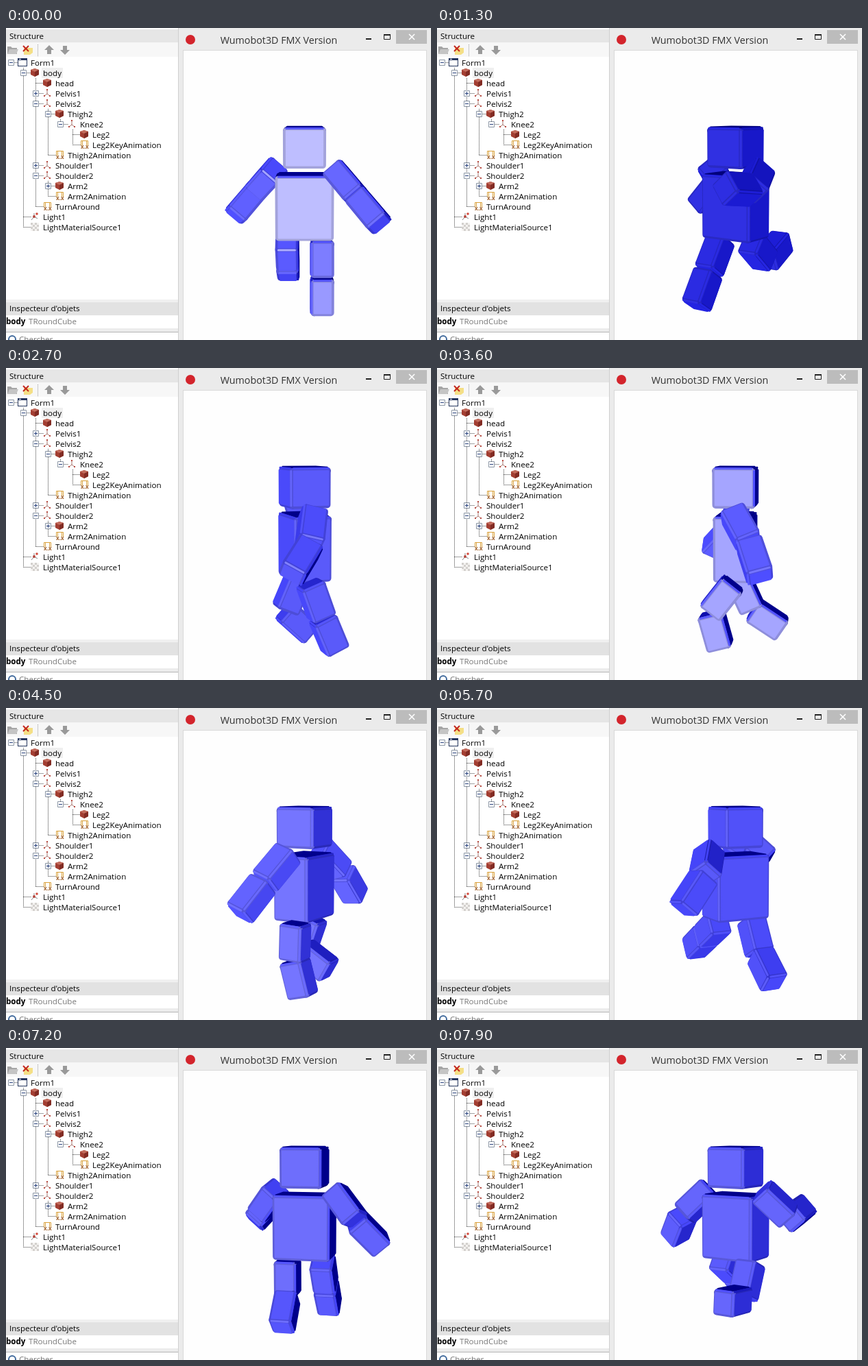
Recreate the animation shown at these times as an HTML page with a canvas. Size 620 px wide and 455 px high, loop 8 s.

```html
<!DOCTYPE html>
<html lang="fr">
<head>
<meta charset="utf-8">
<title>Wumobot3D</title>
<style>
html, body { margin: 0; width: 620px; height: 455px; overflow: hidden; background: #fff; }
canvas { display: block; }
</style>
</head>
<body>
<canvas id="stage" width="620" height="455"></canvas>
<script>
const g = document.getElementById('stage').getContext('2d');
const LOOP = 8000, STEP = 100, RAD = Math.PI / 180;
const UI = '"Open Sans", "Noto Sans", sans-serif';

// ---------- drawing helpers ----------
function box(x, y, w, h, color) {
  g.fillStyle = color;
  g.fillRect(x, y, w, h);
}
function frame(x, y, w, h, color) {
  g.strokeStyle = color;
  g.lineWidth = 1;
  g.strokeRect(x + .5, y + .5, w - 1, h - 1);
}
function path(points, closed) {
  g.beginPath();
  points.forEach(([x, y]) => g.lineTo(x, y));
  if (closed) g.closePath();
}
function poly(points, color, edge = 0) {
  path(points, true);
  g.fillStyle = g.strokeStyle = color;
  g.fill();
  if (!edge) return;
  g.lineWidth = edge;
  g.stroke();
}
function line(points, color, width = 1) {
  path(points);
  g.strokeStyle = color;
  g.lineWidth = width;
  g.stroke();
}
function disc(x, y, r, color) {
  g.beginPath();
  g.arc(x, y, r, 0, 7);
  g.fillStyle = color;
  g.fill();
}
function label(text, x, y, size = 11.6, color = '#000', weight = '') {
  g.font = `${weight} ${size}px ${UI}`;
  g.fillStyle = color;
  g.fillText(text, x, y);
}

// ---------- component tree ----------
const icons = {
  form(x, y) {
    box(x - 7, y - 6, 14, 12, '#23345c');
    box(x - 6, y - 3, 12, 8, '#fff');
    box(x - 5, y - 5, 3, 1, '#fff');
  },
  cube(x, y) {
    poly([[x, y - 6], [x + 6, y - 4], [x + 6, y + 3], [x, y + 6], [x - 6, y + 3], [x - 6, y - 4]], '#a33e32');
    poly([[x, y - 6], [x + 6, y - 4], [x, y - 1], [x - 6, y - 4]], '#c26c5d');
    poly([[x, y - 1], [x + 6, y - 4], [x + 6, y + 3], [x, y + 6]], '#812b23');
  },
  axes(x, y) {
    line([[x, y - 5], [x, y + 1], [x - 4, y + 4]], '#a9756d');
    line([[x, y + 1], [x + 4, y + 4]], '#a9756d');
    [[0, -5], [-4, 4], [4, 4]].forEach(([a, b]) => box(x + a - 1, y + b - 1, 2, 2, '#b7493f'));
  },
  film(x, y) {
    frame(x - 5, y - 6, 11, 12, '#d9a13c');
    box(x - 3, y - 6, 1, 9, '#d9a13c');
    box(x + 3, y - 6, 1, 9, '#d9a13c');
    box(x - 5, y + 1, 11, 6, '#fff');
    label('x.x', x - 5, y + 6, 8, '#a0612c', 'bold');
  },
  light(x, y) {
    line([[x - 5, y + 5], [x - 1, y], [x - 1, y - 5]], '#888');
    line([[x - 1, y], [x + 4, y + 3]], '#888');
    disc(x + 3, y - 4, 1.8, '#d34b3e');
    disc(x - 1, y, 2, '#b7493f');
  },
  checks(x, y) {
    for (let i = 0; i < 16; i++)
      box(x - 6 + i % 4 * 3, y - 6 + (i >> 2) * 3, 3, 3, (i + (i >> 2)) % 2 ? '#f4f2f0' : '#d3d0cd');
  }
};
// depth, icon, expander, caption
const tree = [
  [0, 'form', '-', 'Form1'], [1, 'cube', '-', 'body'], [2, 'cube', '', 'head'],
  [2, 'axes', '+', 'Pelvis1'], [2, 'axes', '-', 'Pelvis2'], [3, 'cube', '-', 'Thigh2'],
  [4, 'axes', '-', 'Knee2'], [5, 'cube', '', 'Leg2'], [5, 'film', '', 'Leg2KeyAnimation'],
  [3, 'film', '', 'Thigh2Animation'], [2, 'axes', '+', 'Shoulder1'], [2, 'axes', '-', 'Shoulder2'],
  [3, 'cube', '+', 'Arm2'], [3, 'film', '', 'Arm2Animation'], [2, 'film', '', 'TurnAround'],
  [1, 'light', '', 'Light1'], [1, 'checks', '', 'LightMaterialSource1']
];
const rowY = i => 50 + 15 * i;

function drawTree() {
  g.setLineDash([1, 1]);
  tree.forEach(([depth], i) => {
    const x = 7.5 + 18 * depth, y = rowY(i) + .5;
    line([[x, y], [x + 11, y]], '#444');
    if (!depth) return;
    let parent = i;
    while (tree[parent][0] >= depth) parent--;
    line([[x, rowY(parent) + 8], [x, y]], '#444');
  });
  g.setLineDash([]);
  box(52, 58, 31, 15, '#efefef');
  tree.forEach(([depth, icon, expander, caption], i) => {
    const x = 7 + 18 * depth, y = rowY(i);
    if (expander) {
      box(x - 4, y - 4, 9, 9, '#fff');
      frame(x - 4, y - 4, 9, 9, '#8c97a5');
      box(x - 2, y, 5, 1, '#27407c');
      if (expander === '+') box(x, y - 2, 1, 5, '#27407c');
    }
    icons[icon](x + 17, y);
    label(caption, x + 29, y + 5);
  });
}

function drawPanel() {
  box(0, 0, 251, 455, '#fff');
  box(0, 2, 251, 19, '#e6e6e6');
  label('Structure', 5, 16);
  box(0, 21, 251, 21, '#f7f7f7');
  poly([[2, 27], [7, 27], [9, 29], [16, 29], [16, 38], [2, 38]], '#a5a5a5');
  poly([[5, 31], [18, 31], [15, 38], [2, 38]], '#c4c4c4');
  poly([[26, 29], [39, 29], [39, 36], [35, 39], [26, 39]], '#f4df86');
  line([[25, 26], [33, 34]], '#c3261d', 2);
  line([[33, 26], [25, 34]], '#c3261d', 2);
  g.setLineDash([1, 1]);
  line([[46.5, 24], [46.5, 41]], '#999');
  g.setLineDash([]);
  const arrow = [[0, -7], [7, 0], [3, 0], [3, 6], [-3, 6], [-3, 0], [-7, 0]];
  poly(arrow.map(([x, y]) => [63 + x, 32 + y]), '#999');
  poly(arrow.map(([x, y]) => [86 + x, 32 - y]), '#999');
  drawTree();
  box(0, 396, 251, 4, '#f0f0f0');
  box(0, 400, 251, 19, '#e2e2e2');
  label("Inspecteur d'objets", 5, 413);
  label('body', 0, 432, 11.6, '#000', 'bold');
  label('TRoundCube', 33, 432, 11.6, '#777');
  box(0, 438, 251, 5, '#ececec');
  box(0, 443, 251, 1, '#b5b5b5');
  g.beginPath();
  g.arc(9, 454, 5, 0, 7);
  g.strokeStyle = '#426b9d';
  g.lineWidth = 2;
  g.stroke();
  label('Chercher', 19, 458, 11.6, '#777');
}

function drawWindow() {
  box(251, 0, 369, 455, '#ebebeb');
  box(251, 0, 1, 455, '#cfcfcf');
  box(258, 32, 356, 423, '#d9d9d9');
  box(259, 33, 354, 422, '#fefefe');
  disc(269, 17, 7, '#d3242c');
  g.textAlign = 'center';
  label('Wumobot3D FMX Version', 398, 23, 14.3, '#333');
  g.textAlign = 'left';
  box(525, 15, 8, 2, '#222');
  frame(551, 9, 10, 8, '#222');
  box(551, 9, 10, 2, '#222');
  box(569, 3, 45, 20, '#bcbcbc');
  line([[588, 9], [596, 17]], '#fff', 1.6);
  line([[596, 9], [588, 17]], '#fff', 1.6);
}

// ---------- walking figure ----------
// time, left arm, left elbow, right arm, right elbow,
// left thigh, left knee, right thigh, right knee, highlight
const poses = [
  [0, 34, 2, -42, 66, 8, 3, -42, 22, 1],
  [1.3, 60, 40, -55, 60, -50, 65, 35, 1, .45],
  [2.7, 18, 20, -35, 20, -20, 3, 24, 70, .92],
  [4.5, 20, -2, -22, 15, 2, 18, 20, 80, 1.08],
  [5.7, -45, 36, 60, 60, 58, 0, -29, 22, .9],
  [6.5, 30, 35, -10, 10, 0, 2, 42, 3, .95],
  [7.9, -25, 50, 25, 75, 55, 5, -25, 70, .95]
];

// plain two-second stride
function stride(t) {
  const w = 2 * Math.PI * (.07 + t / 2), c = 35 * Math.cos(w), s = 30 * Math.sin(w);
  return [-c, 30, c, 30, c, 30 - s, -c, 30 + s, 0];
}

// stride plus offsets blended between the key poses
function poseAt(t) {
  let i = 0;
  while (i < poses.length - 2 && t > poses[i + 1][0]) i++;
  const [a, b] = [poses[i], poses[i + 1]];
  const k = Math.min(1, (t - a[0]) / (b[0] - a[0]));
  const sa = stride(a[0]), sb = stride(b[0]);
  return stride(t).map((v, j) => v + (a[j + 1] - sa[j]) * (1 - k) + (b[j + 1] - sb[j]) * k);
}

function rot(p, i, j, deg) {
  const q = [...p], c = Math.cos(deg * RAD), s = Math.sin(deg * RAD);
  q[i] = p[i] * c - p[j] * s;
  q[j] = p[i] * s + p[j] * c;
  return q;
}
const add = (a, b) => a.map((v, i) => v + b[i]);

// two hinged blocks hanging from a joint
function limb(joint, splay, length, half, bends) {
  const parts = [];
  for (const bend of bends) {
    const turn = p => rot(rot(p, 1, 2, bend), 0, 1, -splay);
    parts.push({ half, turn, at: add(joint, turn([0, length / 2, 0])) });
    joint = add(joint, turn([0, length, 0]));
  }
  return parts;
}

function blocks(p) {
  const same = v => v, arm = [17, 28, 18], leg = [17, 27, 18.5];
  return [
    { half: [42, 47, 28], at: [0, 0, 0], turn: same },
    { half: [30.5, 29, 30.5], at: [0, -86, 0], turn: same },
    ...limb([42, -54, 0], 41, 57, arm, [p[0], p[0] + p[1]]),
    ...limb([-42, -54, 0], -41, 57, arm, [p[2], p[2] + p[3]]),
    ...limb([26, 50, 0], 0, 55, leg, [p[4], p[4] - p[5]]),
    ...limb([-26, 50, 0], 0, 55, leg, [p[6], p[6] - p[7]])
  ];
}

const dot = (a, b) => Math.max(0, a[0] * b[0] + a[1] * b[1] + a[2] * b[2]);

// diffuse light from the left, highlight along the line of sight
function shade(n, gloss, dark = 1) {
  const k = Math.sqrt(dot(n, [-.3, .14, .94]));
  const shine = 85 * dot(n, [-.03, .14, .99]) ** 150;
  const r = Math.max(0, (120 * k - 10 + shine) * gloss * dark);
  const b = Math.min(255, 140 + 160 * k) * (.8 + .2 * Math.min(1, gloss)) * dark;
  return `rgb(${r | 0},${r | 0},${b | 0})`;
}

const project = ([x, y, z]) => {
  const s = 1000 / (1000 - z);
  return [435.5 + x * s, 260 + y * s];
};

function drawBlock({ half, turn, at }, view, gloss) {
  const r = 5, core = half.map(h => h - r), faces = [];
  const place = c => project(view(add(at, turn(c))));
  for (let axis = 0; axis < 3; axis++) for (const sign of [-1, 1]) {
    const normal = [0, 0, 0];
    normal[axis] = sign;
    const n = view(turn(normal)), mid = view(add(at, turn(normal.map((v, i) => v * half[i]))));
    const toEye = -mid[0] * n[0] - mid[1] * n[1] + (1000 - mid[2]) * n[2];
    if (toEye <= 0) continue;
    const corners = grow => [[-1, -1], [1, -1], [1, 1], [-1, 1]].map(([u, v]) => {
      const c = [], i = (axis + 1) % 3, j = (axis + 2) % 3;
      c[axis] = sign * (core[axis] + grow);
      c[i] = u * core[i];
      c[j] = v * core[j];
      return place(c);
    });
    faces.push({ normal, n, core: corners(0), top: corners(r) });
  }
  faces.sort((a, b) => a.n[2] - b.n[2]);
  g.lineJoin = g.lineCap = 'round';
  faces.forEach(f => poly(f.core, shade(f.n, gloss, .86), 2 * r));
  faces.forEach(f => poly(f.top, shade(f.n, gloss), 2));
  // rounded edges between neighbouring faces
  faces.forEach((a, i) => faces.slice(i + 1).forEach(b => {
    const out = add(a.normal, b.normal), along = out.findIndex(v => !v);
    const ends = [-1, 1].map(s => place(out.map((v, j) =>
      j === along ? s * core[j] : v * (core[j] + r * Math.SQRT1_2))));
    const size = Math.hypot(...add(a.n, b.n));
    line(ends, shade(add(a.n, b.n).map(v => v / size), gloss), 3);
  }));
  g.lineCap = 'butt';
}

function drawFigure(t) {
  const pose = poseAt(t);
  const view = p => rot(rot(p, 0, 2, 26.7 * t), 1, 2, -8);
  blocks(pose)
    .map(b => ({ ...b, depth: view(b.at)[2] }))
    .sort((a, b) => a.depth - b.depth)
    .forEach(b => drawBlock(b, view, pose[8]));
}

const start = performance.now();
function tick() {
  const ms = Math.max(0, performance.now() - start) % LOOP;
  drawPanel();
  drawWindow();
  drawFigure(Math.floor(ms / STEP) * STEP / 1000);
  requestAnimationFrame(tick);
}
tick();
</script>
</body>
</html>
```
